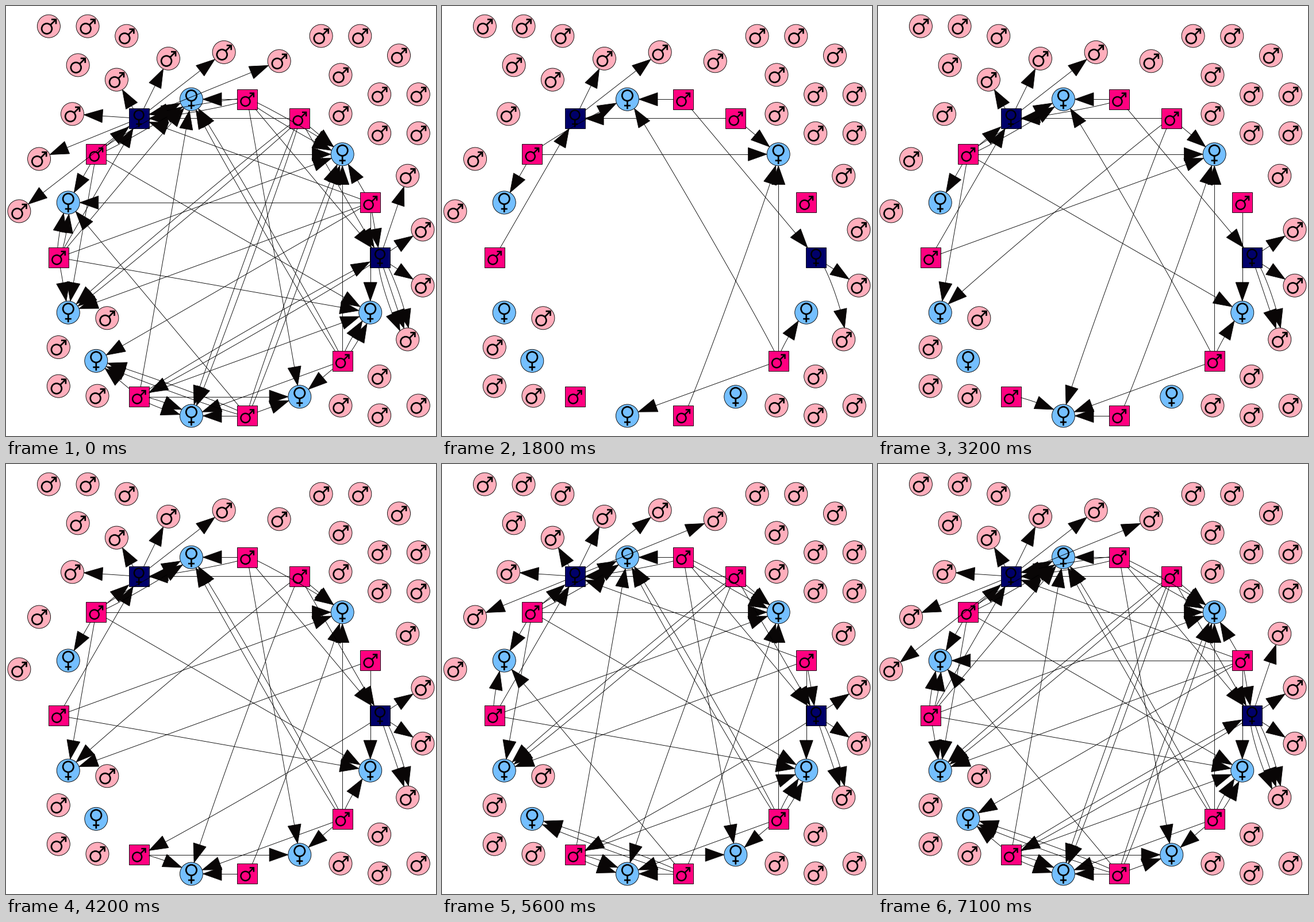
Recreate the animation shown at these times as a matplotlib script. Size 748x748 px, loop 7200 ms.

```python
import numpy as np
import matplotlib.pyplot as plt
from matplotlib.animation import FuncAnimation
from matplotlib.patches import Circle, PathPatch, Polygon, Rectangle
from matplotlib.path import Path

SIZE, DPI = 748, 100
PX = 72 / DPI               # one pixel in points
FRAMES, STEP_MS = 72, 100
CENTER = (371, 437.6)
INNER, OUTER = 279.6, 357.3     # radii of the two rings
RADIUS, HALF = 20, 17.5         # circle radius, half side of a square
ARROW, ARROW_HALF = 32.4, 11.5
SPREAD = 15.3                   # distance between parallel edges
PEN = 0.88 * PX

PINK, BLUE, MAGENTA, NAVY = "#ffaebc", "#74bfff", "#ff0080", "#00006a"
HEAD = "#090606"

RING = "abcdefghijklmnopqr"
SQUARES = "abdeghjmoq"
DARK = "ag"

# Pink circles without any arrow, in steps of a square grid
GRID = 16.92
LOOSE = [
    (4, 0), (8, 0), (12, 1), (7, 4), (32, 1), (36, 1), (40, 3), (34, 5),
    (38, 7), (42, 7), (34, 9), (38, 11), (42, 11), (10, 30), (5, 33),
    (5, 37), (9, 38), (38, 36), (34, 39), (38, 40), (42, 39),
]

# Edges in order of appearance: tail, head, side on which they bend
EDGES = """
    gB hc hi dc aJ aK++ qn oc-
    gC hf+ ef dg ea jg qf- qc qr+
    gD eg+ hg jc hr hk dk- dn- br aI aK mn+ on hf-
    gE ec+ da ep qf+ qp mp am+ bk jr
    gA gF bg mf oi ji+ ol+ dk+ mr ba ec- qr- mn- ol-
    gG aH aK-- bi bc bl ji- jk jf ml ma+ dn+ oc+ op eg-
""".split()


def polar(radius, degrees):
    angle = np.radians(degrees)
    return (CENTER[0] + radius * np.cos(angle),
            CENTER[1] - radius * np.sin(angle))


def fan(names, middle):
    """Spread circles on the outer ring around the given direction."""
    step = 360 / 23
    first = middle - step * (len(names) - 1) / 2
    return {name: polar(OUTER, first + step * i) for i, name in enumerate(names)}


def ring_path(x, y, r):
    circle = Path.circle((x, y), r)
    return Path(circle.vertices, circle.codes)


MALE = Path.make_compound_path(
    ring_path(-3.4, 4.2, 8.9),
    Path([(3, -2.2), (12.6, -11.8)]),
    Path([(4.6, -11.8), (12.6, -11.8), (12.6, -3.8)]))
FEMALE = Path.make_compound_path(
    ring_path(0, -6.5, 9.2),
    Path([(0, 2.9), (0, 17)]),
    Path([(-5.5, 11), (5.5, 11)]))

fig = plt.figure(figsize=(SIZE / DPI, SIZE / DPI), dpi=DPI, facecolor="white")
ax = fig.add_axes([0, 0, 1, 1])
ax.set_xlim(0, SIZE)
ax.set_ylim(SIZE, 0)
ax.axis("off")

linked = {**fan("ABCDEFG", 120), **fan("KJIH", 0)}
pos = {name: polar(INNER, 20 * i) for i, name in enumerate(RING)}
pos.update(linked)


def draw_node(xy, color, square, glyph):
    style = dict(facecolor=color, edgecolor="black", linewidth=PEN, zorder=1)
    x, y = xy
    if square:
        ax.add_patch(Rectangle((x - HALF, y - HALF), 2 * HALF, 2 * HALF, **style))
    else:
        ax.add_patch(Circle(xy, RADIUS, **style))
    scale = 0.9 if square else 1
    shape = Path(glyph.vertices * scale + np.array(xy), glyph.codes)
    ax.add_patch(PathPatch(shape, fill=False, edgecolor="black", zorder=2,
                           linewidth=2.7 * scale * PX,
                           joinstyle="miter", capstyle="butt"))


def outside(pts, name):
    d = pts - np.array(pos[name])
    if name in SQUARES:
        return np.abs(d).max(axis=1) >= HALF
    return np.hypot(*d.T) >= RADIUS


def draw_edge(code):
    tail, head = code[:2]
    shift = (code.count("+") - code.count("-")) * SPREAD / 2
    p, q = np.array(pos[tail]), np.array(pos[head])
    dx, dy = q - p
    normal = np.array([dy, -dx]) / np.hypot(dx, dy)

    # Cubic curve whose control points sit beside its two ends
    t = np.linspace(0, 1, 1601)[:, None]
    pts = p + (q - p) * t * t * (3 - 2 * t) + normal * shift * 3 * t * (1 - t)
    start = np.argmax(outside(pts, tail))
    last = np.flatnonzero(outside(pts, head))[-1]
    tip = pts[last]
    far = np.hypot(*(pts[:last] - tip).T) >= ARROW
    end = np.flatnonzero(far)[-1]
    base = pts[end]

    along = (tip - base) / np.hypot(*(tip - base))
    across = np.array([-along[1], along[0]]) * ARROW_HALF
    arrow = Polygon([base + across, tip, base - across], facecolor=HEAD,
                    edgecolor=HEAD, linewidth=PEN, joinstyle="miter", zorder=3)
    ax.add_patch(arrow)
    body = np.vstack([pts[start:end:20], base])
    line, = ax.plot(*body.T, color="black", linewidth=PEN, zorder=3)
    return line, arrow


for name, xy in pos.items():
    if name in linked:
        draw_node(xy, PINK, False, MALE)
    elif name in DARK:
        draw_node(xy, NAVY, True, FEMALE)
    elif name in SQUARES:
        draw_node(xy, MAGENTA, True, MALE)
    else:
        draw_node(xy, BLUE, False, FEMALE)
for col, row in LOOSE:
    draw_node((6.7 + GRID * col, 35.2 + GRID * row), PINK, False, MALE)

edges = [draw_edge(code) for code in EDGES]


def update(frame):
    # The full graph opens the loop, then it is rebuilt edge by edge
    shown = len(edges) if frame == 0 else frame - 1
    for i, parts in enumerate(edges):
        for part in parts:
            part.set_visible(i < shown)
    return [part for parts in edges for part in parts]


anim = FuncAnimation(fig, update, frames=FRAMES, interval=STEP_MS,
                     repeat=True, repeat_delay=0, blit=False)
plt.show()
```
